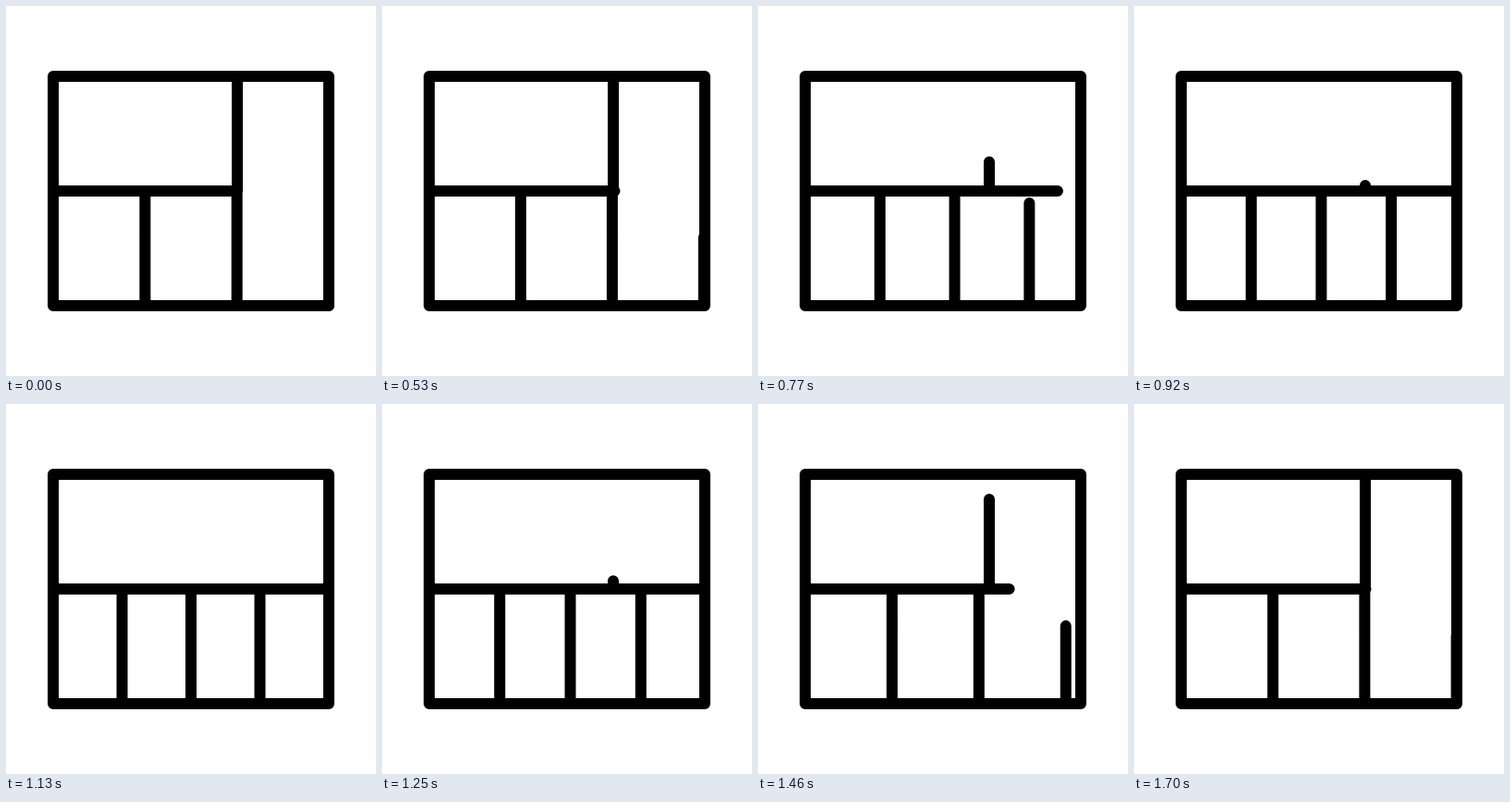
Recreate the animation shown at these times as an HTML page. Size 400 by 400 pixels, loop 1730 ms.

```html
<!DOCTYPE html>
<html>
<head>
<meta charset="utf-8">
<title>Shifting layout grid</title>
<style>
  html, body { margin: 0; width: 100%; height: 100%; overflow: hidden; background: #fff; }
  svg { display: block; width: 100vw; height: 100vh; }
  path { fill: none; stroke: #000; stroke-width: 12; stroke-linecap: round; stroke-linejoin: round; }
</style>
</head>
<body>
<svg viewBox="0 0 400 400">
  <path d="M51 76H349V324H51Z"/>
  <path id="bars"/>
</svg>
<script>
const LOOP = 1730, STEP = 30, OFFSET = 20;
const OPEN = 483, CLOSE = 1157, DURATION = 600;
const LEFT = 51, RIGHT = 349, TOP = 76, MIDDLE = 200, BOTTOM = 324, SPLIT = 250;
const bars = document.getElementById('bars');

const mix = (a, b, p) => a + (b - a) * p;

// cubic-bezier(.4, 0, .2, 1), solved by bisection
function ease(u) {
  if (u <= 0) return 0;
  if (u >= 1) return 1;
  let lo = 0, hi = 1, s;
  for (let i = 0; i < 24; i++) {
    s = (lo + hi) / 2;
    const x = 1.2 * s * (1 - s) ** 2 + 0.6 * s * s * (1 - s) + s ** 3;
    if (x < u) lo = s; else hi = s;
  }
  return s * s * (3 - 2 * s);
}

// 0: three columns with a tall right cell, 1: four equal columns
function progress(time) {
  const t = Math.floor((time - OFFSET) / STEP) * STEP + OFFSET;
  return ease((t - OPEN) / DURATION) - ease((t - CLOSE) / DURATION);
}

function draw() {
  const p = progress(performance.now() % LOOP);
  const gap = (RIGHT - LEFT) / mix(3, 4, 0) * mix(1, 0.75, p);
  const column = (n, top) => `M${LEFT + n * gap} ${BOTTOM}V${top}`;
  bars.setAttribute('d', [
    `M${LEFT} ${MIDDLE}H${mix(SPLIT, RIGHT, p)}`,
    `M${SPLIT} ${MIDDLE}V${mix(TOP, MIDDLE, p)}`,
    column(1, MIDDLE),
    column(2, MIDDLE),
    column(3, mix(251, MIDDLE, p))
  ].join(''));
  requestAnimationFrame(draw);
}
draw();
</script>
</body>
</html>
```
